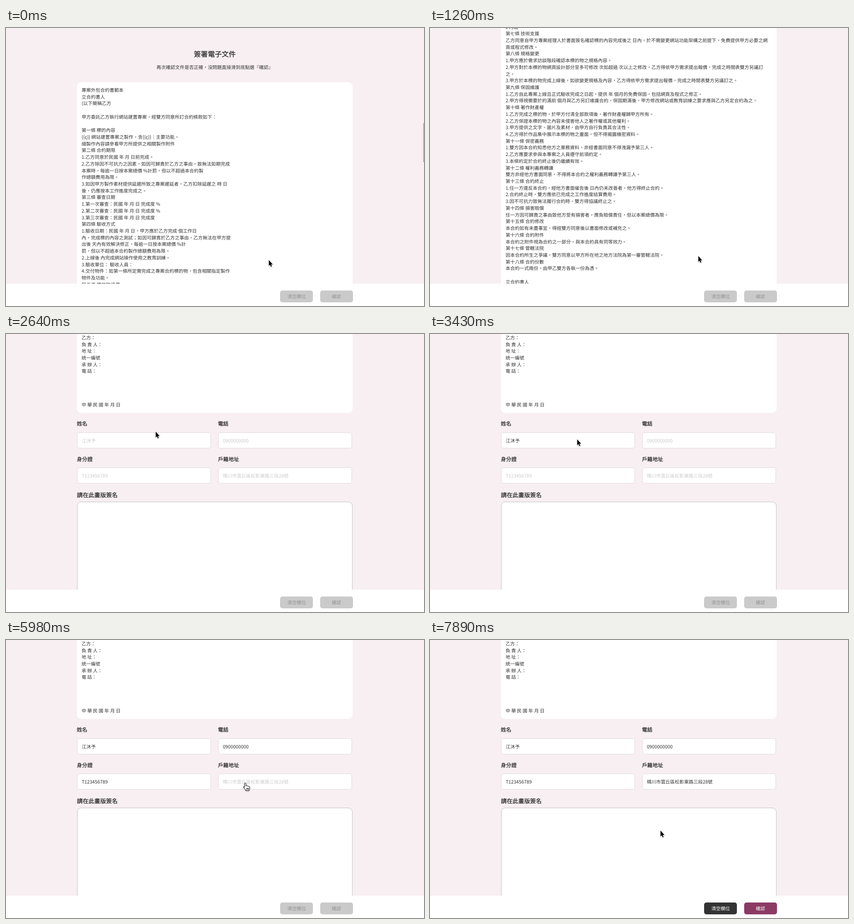
These frames come from a looping animation (918 px wide and 610 px high, 8000 ms). An HTML page:

```html
<!DOCTYPE html>
<html lang="zh-TW">
<head>
<meta charset="utf-8">
<title>簽署電子文件</title>
<style>
html, body { margin: 0; width: 918px; height: 610px; overflow: hidden; }
body {
  position: relative; background: #f8eff3; color: #333;
  font: 10.24px/14.72px "Noto Sans CJK TC", "Noto Sans TC", "Noto Sans CJK", sans-serif;
  text-rendering: geometricPrecision;
}
#page { position: absolute; left: 0; top: 0; width: 917px; }
.text { position: absolute; line-height: 20px; white-space: pre; }
.center { left: 0; width: 917px; text-align: center; }
.label { color: #222; -webkit-text-stroke: .25px #222; }
#card {
  position: absolute; left: 156px; top: 119px; width: 605px; box-sizing: border-box;
  padding: 9.9px 10px; background: #fff; border-radius: 9px; white-space: pre;
}
#form { position: absolute; left: 0; }
.field, .pad { position: absolute; box-sizing: border-box; background: #fff; }
.field {
  width: 294px; height: 35px; padding-left: 9.2px; line-height: 33px;
  border: 1px solid #e0d9dc; border-radius: 5px; white-space: pre;
}
.pad { left: 156px; top: 368px; width: 605px; height: 220px; border: 1.3px solid #c2c0c1; border-radius: 9px; }
#bar { position: absolute; left: 0; top: 561px; width: 918px; height: 49px; background: #fff; }
.button {
  position: absolute; top: 15px; width: 72px; height: 26px; line-height: 26px;
  border-radius: 5px; text-align: center;
}
#thumb { position: absolute; left: 916px; top: 208px; width: 4px; height: 87px; border-radius: 2px; background: #b9b5b7; }
#pointer { position: absolute; left: 0; top: 0; overflow: visible; filter: drop-shadow(0 1px 1px rgba(0,0,0,.25)); }
</style>
</head>
<body>
<div id="page">
  <div id="card"></div>
  <div id="form"><div class="pad"></div></div>
</div>
<div id="bar"></div>
<div id="thumb"></div>
<svg id="pointer" width="1" height="1">
  <path id="arrow" d="M.3.3V13L3.1 10.4 4.9 14.9 6.9 14 5.1 9.7H8.8Z" fill="#000" stroke="#fff" stroke-width="1.4" paint-order="stroke"/>
  <path id="hand" d="M-1.6 10V1.8a1.6 1.6 0 0 1 3.2 0V7q.2-1.3 1.6-1.1 1.3.1 1.5 1.4.2-.9 1.3-.8 1.3.1 1.4 1.6.3-.7 1.1-.6 1.2.2 1.2 1.8V11.5q0 2-1.2 3.6V17H1V15.5C-1 13.8-2 11.8-4 9.8-4.8 8.6-3.4 7.6-2.6 8.4ZM3 11v4M5 11v4M7 11v4" fill="#fff" stroke="#000"/>
</svg>
<script>
const contract = `專案外包合約書範本
立合約書人
(以下簡稱乙方

甲方委託乙方執行網站建置專案，經雙方同意所訂合約條款如下：

第一條 標的內容
{{ç}} 網站建置專案之製作，含{{ç}}｜主要功能。
細製作內容請參看甲方所提供之相關製作附件
第二條 合約期限
1.乙方同意於民國 年 月 日前完成。
2.乙方除因不可抗力之因素，如因可歸責於乙方之事由，致無法如期完成
本案時，每逾一日按本案總價 %計罰，但以不超過本合約製
作總額費用為限。
3.如因甲方製作素材提供延遲所致之專案遲延者，乙方扣除延遲之 時 日
後，仍應按本工作進度完成之。
第三條 審查日期
1.第一次審查：民國 年 月 日 完成度 %
2.第二次審查：民國 年 月 日 完成度 %
3.第三次審查：民國 年 月 日 完成度
第四條 驗收方式
1.驗收日期：民國 年 月 日，甲方應於乙方完成 個工作日
內，完成標的內容之測試；如因可歸責於乙方之事由，乙方無法在甲方提
出後 天內有效解決修正，每逾一日按本案總價 %計
罰，但以不超過本合約製作總額費用為限。
2.上線後 內完成網站操作使用之教育訓練。
3.驗收單位： 驗收人員：
4.交付物件：如第一條所定需完成之專案合約標的物，包含相關指定製作
物件及功能。
第五條 標的物總價
1.網站建置專案共 件，合計新台幣 元整。
2.其他
3.本案件結算金額共計新台幣 元整，實際支付金額為新台幣
元整
第六條 付款辦法c
\u3000 階段性付款：
1.本標的物之網站頁面完成時，乙方開立發票向甲方請款，甲方應於接到發票後 日內，以新台幣 元整（未稅）之
2.本標的物程式開發完成，上線測試前，乙方開立發票向甲方請款，甲方應於接到發票後 日內，開具簽約金額計新台幣 元整（未
稅）之3.本標的物經內容整合上線測試完成，甲乙雙方確認無誤時，乙方開立發票並附回郵信封向甲方請款，甲方應於接到發票後
日內，開具簽約金額計新台幣 元整（未稅）之
c\u3000  一次付清：
專案依合約到期日完成時，乙方開立發票並附回郵信封向甲方請款，甲方應於接到發票後 日內，開具簽約金額計新台幣 元整（未
稅）之
c\u3000  按時收費：
c 月結
第七條 技術支援
乙方同意自甲方專案經理人於書面簽名確認標的內容完成後之 日內，於不需變更網站功能架構之前提下，免費提供甲方必要之網
頁或程式修改。
第八條 規格變更
1.甲方應於需求訪談階段確認本標的物之規格內容。
2.甲方對於本標的物網頁設計部分至多可修改 次如超過 次以上之修改，乙方得依甲方需求提出報價，完成之時間表雙方另議訂
之。
3.甲方於本標的物完成上線後，如欲變更規格及內容，乙方得依甲方需求提出報價，完成之時間表雙方另議訂之。
第九條 保固維護
1.乙方自此專案上線且正式驗收完成之日起，提供 年 個月的免費保固，包括網頁及程式之修正。
2.甲方得視需要於約滿前 個月與乙方另訂維護合約，保固期滿後，甲方修改網站或教育訓練之要求應與乙方另定合約為之。
第十條 著作財產權
1.乙方完成之標的物，於甲方付清全部款項後，著作財產權歸甲方所有。
2.乙方保證本標的物之內容未侵害他人之著作權或其他權利。
3.甲方提供之文字、圖片及素材，由甲方自行負責其合法性。
4.乙方得於作品集中展示本標的物之畫面，但不得揭露機密資料。
第十一條 保密義務
1.雙方因本合約知悉他方之業務資料，非經書面同意不得洩漏予第三人。
2.乙方應要求參與本專案之人員遵守前項約定。
3.本條約定於合約終止後仍繼續有效。
第十二條 權利義務轉讓
雙方非經他方書面同意，不得將本合約之權利義務轉讓予第三人。
第十三條 合約終止
1.任一方違反本合約，經他方書面催告後 日內仍未改善者，他方得終止合約。
2.合約終止時，雙方應依已完成之工作進度結算費用。
3.因不可抗力致無法履行合約時，雙方得協議終止之。
第十四條 損害賠償
任一方因可歸責之事由致他方受有損害者，應負賠償責任，但以本案總價為限。
第十五條 合約修改
本合約如有未盡事宜，得經雙方同意後以書面修改或補充之。
第十六條 合約附件
本合約之附件視為合約之一部分，與本合約具有同等效力。
第十七條 管轄法院
因本合約所生之爭議，雙方同意以甲方所在地之地方法院為第一審管轄法院。
第十八條 合約份數
本合約一式兩份，由甲乙雙方各執一份為憑。

立合約書人
甲方：
負 責 人：
地 址：
統一編號
承 辦 人：
電 話：
乙方：
負 責 人：
地 址：
統一編號
承 辦 人：
電 話：




中 華 民 國 年 月 日`;

const $ = id => document.getElementById(id);
const LOOP = 8000;
const cardHeight = contract.split("\n").length * 14.72 + 19.8;
const formTop = Math.round(119 + cardHeight - 173.2);   // scroll offset while the form is filled in
const pageEnd = formTop + 103;

$("card").textContent = contract;
$("card").style.height = cardHeight + "px";
$("form").style.top = formTop + "px";

function add(parent, cls, text, style) {
  const el = document.createElement("div");
  el.className = cls;
  el.textContent = text;
  Object.assign(el.style, style);
  parent.append(el);
  return el;
}
// Text whose glyphs are centred on height y
function addText(parent, cls, text, y, size, x) {
  const style = { top: y - 10 - size * .056 + "px", fontSize: size + "px" };
  if (x !== undefined) style.left = x + "px";
  return add(parent, "text " + cls, text, style);
}

addText($("page"), "center label", "簽署電子文件", 58, 15.36);
addText($("page"), "center", "再次確認文件是否正確，沒問題直接滑到底點選『確認』", 86.3, 10.24);
addText($("form"), "label", "請在此畫版簽名", 354, 12.8, 155.7);

const fields = [
  { label: "姓名", value: "江沐予", x: 156, y: 216, fill: [3200, 3430, 4] },
  { label: "電話", value: "0900000000", x: 466, y: 216, fill: [4250, 4500, 4] },
  { label: "身分證", value: "T123456789", x: 156, y: 293.5, fill: [5520, 5660, 3] },
  { label: "戶籍地址", value: "晴川市雲丘區松影東路三段28號", x: 466, y: 293.5, fill: [6550, 6610, 2] }
];
for (const f of fields) {
  addText($("form"), "label", f.label, f.y - 18, 11.52, f.x - .4);
  f.el = add($("form"), "field", f.value, { left: f.x + "px", top: f.y - .3 + "px" });
}

const sign = [7740, 7890, 3];
const buttons = [
  { text: "清空欄位", x: 602.3, color: [51, 51, 51] },
  { text: "確認", x: 689.7, color: [139, 58, 100] }
];
for (const b of buttons) b.el = add($("bar"), "button", b.text, { left: b.x + "px" });

// Start, end, number of steps, then the pointer's goal
const moves = [
  [80, 390, 5, 719, 590], [620, 790, 3, 589, 500], [2390, 2640, 4, 328.5, 214],
  [2870, 3120, 4, 323, 231], [3840, 4080, 4, 537, 231.5], [4880, 5350, 7, 375.5, 311],
  [5820, 5980, 3, 525.5, 313.5], [6140, 6140, 1, 524.5, 313.5], [6300, 6300, 1, 523, 313.5],
  [6960, 7200, 4, 508, 416.5], [7370, 7530, 3, 506, 418]
];
const scrolls = [
  [0, 0], [1040, 130], [1100, 407.5], [1200, pageEnd * .51], [1270, pageEnd * .69],
  [1340, pageEnd * .83], [1420, pageEnd * .92], [1490, pageEnd * .975], [1570, pageEnd],
  [2070, pageEnd - 35], [2150, pageEnd - 80], [2220, formTop]
];

const mix = (a, b, p) => a + (b - a) * p;
const ease = p => p * p * (3 - 2 * p);
const rgb = (from, to, p) => `rgb(${from.map((v, i) => Math.round(mix(v, to[i], p)))})`;
const grey = v => [v, v, v];

function progress(t, [start, end, count]) {
  if (t < start) return 0;
  if (t >= end) return 1;
  return (Math.floor((t - start) / (end - start) * (count - 1)) + 1) / count;
}

function pointerAt(t) {
  let x = 577, y = 509;
  for (const m of moves) {
    const p = ease(progress(t, m));
    x = mix(x, m[3], p);
    y = mix(y, m[4], p);
  }
  return [x, y];
}

// The hand shows over anything still waiting for a click
function isHand(t, x, y) {
  if (t < 2390) return false;
  const open = fields.some(f => t < f.fill[0] && x > f.x && x < f.x + 294 && y > f.y && y < f.y + 35);
  return open || (t < sign[0] && y > 368);
}

function draw(t) {
  const scroll = scrolls.filter(s => s[0] <= t).pop()[1];
  $("page").style.transform = `translateY(${-scroll}px)`;
  $("thumb").style.display = t < 1040 ? "" : "none";

  for (const f of fields) f.el.style.color = rgb(grey(203), grey(51), progress(t, f.fill));
  const p = progress(t, sign);
  for (const b of buttons) {
    b.el.style.background = rgb(grey(202), b.color, p);
    b.el.style.color = rgb(grey(148), grey(255), p);
  }

  const [x, y] = pointerAt(t);
  const hand = isHand(t, x, y);
  $("pointer").style.transform = `translate(${x}px, ${y}px)`;
  $("hand").style.display = hand ? "" : "none";
  $("arrow").style.display = hand ? "none" : "";
}

function tick() {
  draw(performance.now() % LOOP);
  requestAnimationFrame(tick);
}
tick();
</script>
</body>
</html>
```
